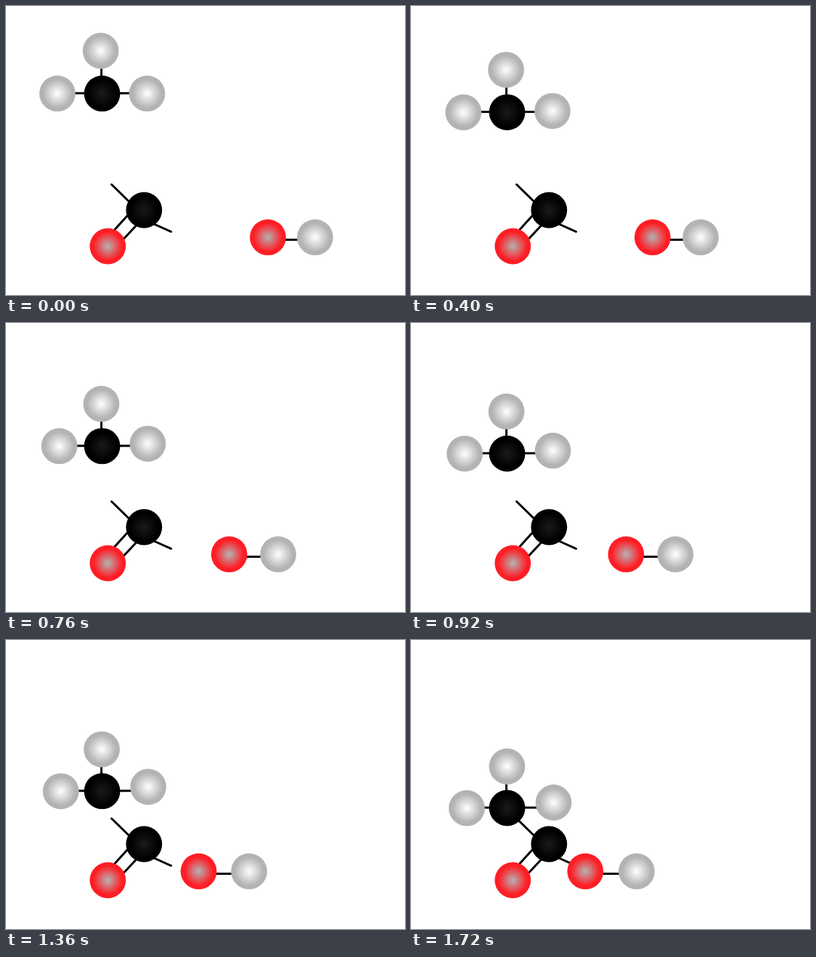
Write an HTML page that moves like this. It is 550 by 400 pixels and loops after 2.16 s.

```html
<!DOCTYPE html>
<html lang="en">
<head>
<meta charset="utf-8">
<title>Molecule assembly</title>
<style>
  html, body { margin: 0; width: 100%; height: 100%; overflow: hidden; background: #fff; }
  svg { display: block; width: 550px; height: 400px; }
  .bonds { stroke: #000; stroke-width: 3; stroke-linecap: round; fill: none; }
</style>
</head>
<body>
<svg viewBox="0 0 550 400">
  <defs>
    <radialGradient id="hydrogen">
      <stop offset="0" stop-color="#fff"/>
      <stop offset=".8" stop-color="#b3b3b3"/>
    </radialGradient>
    <radialGradient id="oxygen">
      <stop offset="0" stop-color="#b3b3b3"/>
      <stop offset=".8" stop-color="#ff1d25"/>
    </radialGradient>
    <radialGradient id="carbon">
      <stop offset="0" stop-color="#1a1a1a"/>
      <stop offset=".8" stop-color="#000"/>
    </radialGradient>
  </defs>
  <g class="bonds">
    <path d="M145.5 247L175 276M200 300L227.5 312.3M172 285L144 316M184 299L156 329"/>
    <path id="moving"/>
  </g>
  <g id="atoms"></g>
</svg>
<script>
const STEP = 40, STEPS = 43, LOOP = 2160;

// kind, start x, y, end x, y
const atoms = [
  ['carbon', 190.3, 282.5, 190.3, 282.5],
  ['oxygen', 140.3, 332.5, 140.3, 332.5],
  ['carbon', 132.5, 121.2, 132.5, 232.5],
  ['hydrogen', 130.6, 62, 132.4, 175],
  ['hydrogen', 70.8, 121.2, 76.9, 232.7],
  ['hydrogen', 194.5, 121.2, 196.5, 225],
  ['oxygen', 361, 320.2, 240.3, 320.2],
  ['hydrogen', 426, 320.2, 311, 320.2]
];

const group = document.getElementById('atoms');
const moving = document.getElementById('moving');
const circles = atoms.map(([kind]) => {
  const c = document.createElementNS('http://www.w3.org/2000/svg', 'circle');
  c.setAttribute('r', 24.9);
  c.setAttribute('fill', `url(#${kind})`);
  return group.appendChild(c);
});

function draw(ms) {
  const p = Math.min(STEPS, Math.floor((ms % LOOP) / STEP)) / STEPS;
  const pos = atoms.map(([, x0, y0, x1, y1]) => [x0 + (x1 - x0) * p, y0 + (y1 - y0) * p]);
  pos.forEach(([x, y], i) => {
    circles[i].setAttribute('cx', x);
    circles[i].setAttribute('cy', y);
  });
  const [, , carbon, top, left, right, oxygen, end] = pos;
  const y = carbon[1] - 0.5;
  moving.setAttribute('d',
    `M${left[0]} ${y}H${right[0]}M131.5 ${top[1]}V${y}M${oxygen[0]} 323.4H${end[0]}`);
}

const start = performance.now();
function tick() {
  draw(performance.now() - start);
  requestAnimationFrame(tick);
}
tick();
</script>
</body>
</html>
```
